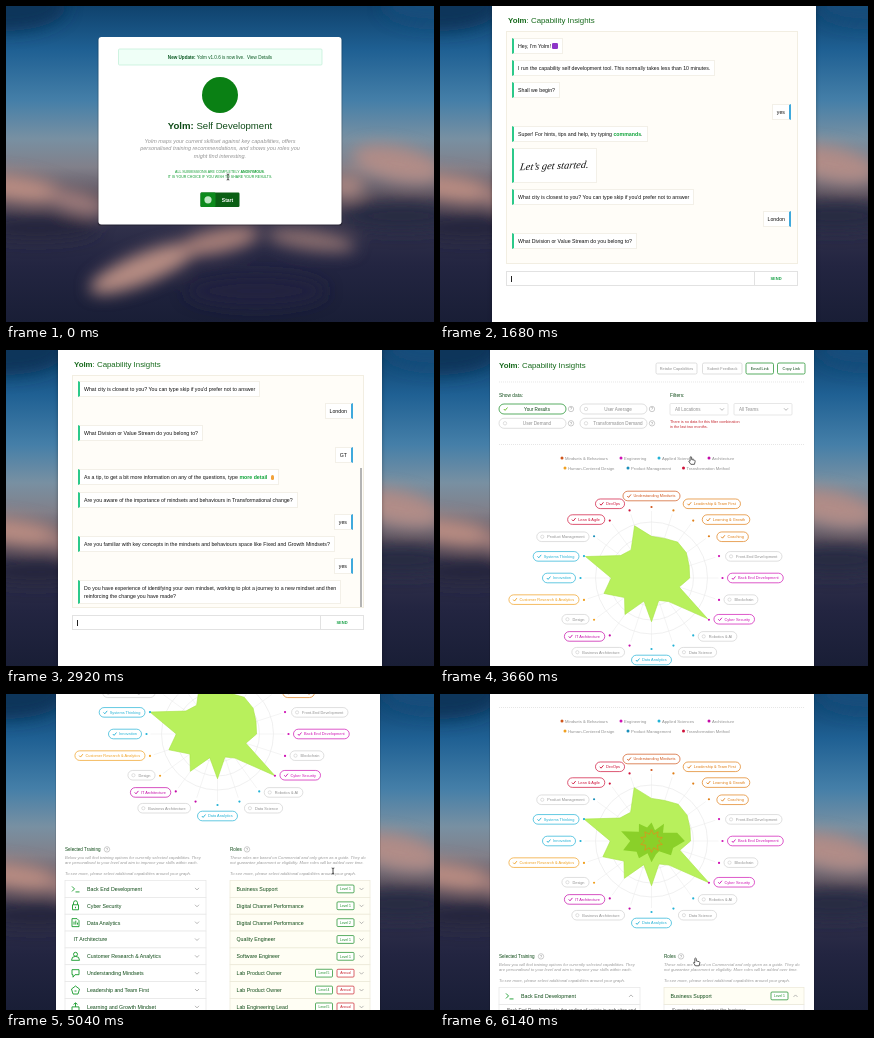
Animation of 428x316 px, one loop 6160 ms. Source, as an HTML page:

```html
<!DOCTYPE html>
<html lang="en">
<head>
<meta charset="utf-8">
<title>Capability Insights</title>
<style>
  html, body { margin: 0; width: 100%; height: 100%; overflow: hidden; }
  body { position: relative; background: #1b2038; font-family: "Liberation Sans", Arial, sans-serif; }
  .layer { position: absolute; left: 0; top: 0; width: 428px; height: 316px; overflow: hidden; }
  svg text { font-family: "Liberation Sans", Arial, sans-serif; white-space: pre; }
  .b { font-weight: bold; }
  .i { font-style: italic; }
  .mid { text-anchor: middle; }
  #chat .page { position: absolute; left: 52px; width: 324px; height: 316px; background: #fff; box-shadow: 0 0 4px #0005; }
  #chat h1 { position: absolute; left: 68px; top: 9px; margin: 0; font: 7.85px/11px "Liberation Sans", Arial, sans-serif; color: #176a1c; }
  #log {
    position: absolute; left: 66px; top: 25px; width: 292px; height: 233px; box-sizing: border-box;
    border: 1px solid #f2eee2; background: #fffdf8; padding: 6px 6px 3px 5px;
    display: flex; flex-direction: column; align-items: flex-start; gap: 6.1px; overflow: hidden;
  }
  #log.full { padding-right: 10px; }
  .msg {
    flex: none; box-sizing: border-box; padding: 3px 4px; font-size: 5.24px; line-height: 8px; color: #111;
    background: #fff; border: 1px solid #f3f0e8; border-left: 2px solid #2cc98a; white-space: nowrap;
  }
  .msg.me { align-self: flex-end; border-left: 1px solid #f3f0e8; border-right: 2px solid #3fa9dc; }
  .msg b { color: #12a53c; }
  .msg .script { display: block; height: 26.5px; width: 74px; font: italic 10.4px/27px "Liberation Serif", Times, serif; text-indent: 2px; transform: rotate(-2deg) skewX(-10deg); }
  .dot { display: inline-block; width: 5.4px; height: 5.4px; border-radius: 1.3px; background: #8d35c8; vertical-align: -0.8px; }
  .tip { width: 3.6px; height: 5px; border-radius: 2px; background: #f2a23a; margin-left: 2px; }
  #thumb { position: absolute; left: 353.5px; width: 2.6px; background: #b4b4b4; }
  #entry { position: absolute; left: 66px; top: 265px; width: 292px; height: 15px; box-sizing: border-box; border: 1px solid #e2e2e2; font-size: 5.24px; line-height: 14px; color: #111; padding-left: 4px; }
  #entry i { display: inline-block; width: .6px; height: 5.6px; background: #222; vertical-align: -1px; }
  #entry b { position: absolute; left: 247px; right: 0; top: 0; height: 13px; border-left: 1px solid #e2e2e2; text-align: center; font-size: 4px; line-height: 14px; color: #16a045; }
</style>
</head>
<body>
<svg class="layer" id="sky" viewBox="0 0 428 316"></svg>
<svg class="layer" id="landing" viewBox="0 0 428 316"></svg>
<div class="layer" id="chat">
  <div class="page"></div>
  <h1><b>Yolm</b>: Capability Insights</h1>
  <div id="log"></div>
  <div id="thumb"></div>
  <div id="entry"><span></span><i></i><b>SEND</b></div>
</div>
<svg class="layer" id="results" viewBox="0 0 428 316"></svg>
<svg class="layer" id="pointer" viewBox="0 0 428 316"></svg>
<script>
const LOOP = 6160, CHAT_AT = 440, RESULTS_AT = 3200;
const $ = id => document.getElementById(id);
const clamp = v => Math.max(0, Math.min(1, v));
const smooth = v => v * v * (3 - 2 * v);
const DARK = '#0d4a16', GREEN = '#148a22', GREY = '#8f8f8f', LINE = '#d2d2d2';

// Drawing helpers; y is the vertical middle of a text line.
const text = (x, y, size, str, fill = '#111', cls = '') =>
  `<text x="${x}" y="${y + size * .36}" font-size="${size}" fill="${fill}" class="${cls}">${str}</text>`;
const box = (x, y, w, h, r, fill, stroke = 'none', extra = '') =>
  `<rect x="${x}" y="${y}" width="${w}" height="${h}" rx="${r}" fill="${fill}" stroke="${stroke}" stroke-width=".7" ${extra}/>`;
const circle = (x, y, r, fill, stroke = 'none') =>
  `<circle cx="${x}" cy="${y}" r="${r}" fill="${fill}" stroke="${stroke}" stroke-width=".6"/>`;
const line = (d, stroke, w = .7, extra = '') =>
  `<path d="${d}" fill="none" stroke="${stroke}" stroke-width="${w}" ${extra}/>`;
const tick = (x, y, c) => line(`M${x - 1.7} ${y}l1.3 1.4 2.4 -2.9`, c, .9);
const chevron = (x, y, id = '') => line(`M${x - 2} ${y - 1}l2 2 2 -2`, '#999', .7, id && `id="${id}"`);
const help = (x, y) => circle(x, y, 2.7, '#fff', '#aaa') + text(x, y, 3.6, '?', '#777', 'mid');
const pen = document.createElement('canvas').getContext('2d');
const widthOf = (str, size) => {
  pen.font = '40px "Liberation Sans", Arial, sans-serif';
  return pen.measureText(str).width * size / 40;
};

// Blurred sky
const blob = (x, y, rx, ry, fill, turn = 0) =>
  `<ellipse cx="${x}" cy="${y}" rx="${rx}" ry="${ry}" fill="${fill}" transform="rotate(${turn} ${x} ${y})"/>`;
const stops = [[0, '#0f426d'], [14, '#1f6093'], [30, '#457fa8'], [42, '#7890a2'], [51, '#81808a'],
  [61, '#5a505d'], [70, '#30304a'], [82, '#232541'], [100, '#191e36']];
$('sky').innerHTML = `<defs><linearGradient id="air" x2="0" y2="1">
  ${stops.map(([o, c]) => `<stop offset="${o}%" stop-color="${c}"/>`).join('')}</linearGradient>
  <filter id="blur" x="-50%" y="-50%" width="200%" height="200%"><feGaussianBlur stdDeviation="8"/></filter></defs>
  <rect width="428" height="316" fill="url(#air)"/><g filter="url(#blur)">
  ${blob(10, 182, 50, 13, '#b98c82', 8)}${blob(70, 196, 32, 10, '#a07d7b', 15)}
  ${blob(30, 222, 62, 12, '#27273d')}${blob(392, 158, 46, 17, '#b18c87', 12)}
  ${blob(340, 180, 18, 12, '#a98580')}${blob(395, 210, 62, 15, '#252a43')}
  ${blob(138, 262, 58, 15, '#b78d83', -22)}${blob(212, 235, 42, 12, '#a98079', -12)}
  ${blob(305, 234, 45, 10, '#8d6f70', 8)}${blob(250, 285, 70, 16, '#222440')}
  ${blob(0, 0, 60, 25, '#0b355a')}${blob(428, 0, 50, 18, '#164d7b')}</g>`;

// Landing card
const NAME = '<tspan class="b">Yolm</tspan>';
$('landing').innerHTML =
  box(91.5, 31.5, 245, 188.5, 3, '#0003') + box(92.5, 31, 243, 187.5, 3, '#fff') +
  box(112.5, 43, 203.5, 16, 1, '#effff7', '#bdeed6') +
  text(214, 51, 4.6, '<tspan class="b">New Update:</tspan> Yolm v1.0.6 is now live.  View Details', '#0c5a24', 'mid') +
  circle(214, 89, 18, '#0a8014') +
  text(214, 119.3, 9.6, '<tspan class="b">Yolm:</tspan> Self Development', DARK, 'mid') +
  ['Yolm maps your current skillset against key capabilities, offers',
   'personalised training recommendations, and shows you roles you',
   'might find interesting.'].map((s, i) => text(214, 134.7 + i * 7.6, 5.5, s, '#949494', 'mid i')).join('') +
  text(214, 165.3, 3.56, 'ALL SUBMISSIONS ARE COMPLETELY <tspan class="b">ANONYMOUS</tspan>.', '#0a9a2c', 'mid') +
  text(214, 170.5, 3.56, 'IT IS YOUR CHOICE IF YOU WISH TO SHARE YOUR RESULTS.', '#0a9a2c', 'mid') +
  box(194.5, 186.5, 39, 14.5, 1.2, '#0a5f14') + box(194.5, 186.5, 15, 14.5, 1.2, '#0c8a1c') +
  circle(202, 193.8, 3.6, '#bfe8c4') + text(221.5, 193.8, 5, 'Start', '#fff', 'mid b');

// Chat script: time, text, own message
const script = [
  [480, 'Hey, I\'m Yolm! <span class="dot"></span>'],
  [580, 'I run the capability self development tool. This normally takes less than 10 minutes.'],
  [690, 'Shall we begin?'],
  [920, 'yes', 1],
  [1000, 'Super! For hints, tips and help, try typing <b>commands</b>.'],
  [1090, '<span class="script">Let\u2019s get started.</span>'],
  [1190, 'What city is closest to you? You can type skip if you\'d prefer not to answer'],
  [1480, 'London', 1],
  [1570, 'What Division or Value Stream do you belong to?'],
  [1940, 'GT', 1],
  [2040, 'As a tip, to get a bit more information on any of the questions, type <b>more detail</b> <span class="dot tip"></span>'],
  [2140, 'Are you aware of the importance of mindsets and behaviours in Transformational change?'],
  [2400, 'yes', 1],
  [2480, 'Are you familiar with key concepts in the mindsets and behaviours space like Fixed and Growth Mindsets?'],
  [2740, 'yes', 1],
  [2820, 'Do you have experience of identifying your own mindset, working to plot a journey to a new mindset and then<br>reinforcing the change you have made?'],
];
const typed = [[760, 'yes', 920], [1240, 'London', 1480], [1800, 'GT', 1940], [2260, 'yes', 2400], [2600, 'yes', 2740], [3000, 'yes', 3140]];
const log = $('log');
const msgs = script.map(([at, html, me]) => {
  const el = document.createElement('div');
  el.className = me ? 'msg me' : 'msg';
  el.innerHTML = html;
  log.append(el);
  return { at, el };
});

// Results: controls
const button = (x, w, label, on) =>
  box(x, 13, w, 11, 1.5, '#fff', on ? GREEN : LINE) + text(x + w / 2, 18.4, 3.9, label, on ? DARK : GREY, 'mid');
const toggle = (x, y, label, on, id = '') =>
  box(x, y - 5, 67, 10, 5, '#fff', on ? GREEN : LINE, id && `id="${id}"`) +
  (on ? tick(x + 6.5, y, '#63b81e') : circle(x + 6, y, 1.7, '#fff', '#ccc')) +
  text(x + 38, y, 4.6, label, on ? DARK : GREY, 'mid') + help(x + 72, y);
const select = (x, label) =>
  box(x, 53.5, 58, 11.5, 1, '#fff', '#ddd') + text(x + 5, 59.3, 4.5, label, GREY) + chevron(x + 52, 59.3);
const dotted = y => line(`M59 ${y}H365`, '#dcdcdc', .7, 'stroke-dasharray="1 1"');
const controls =
  text(59, 14.8, 7.85, NAME + ': Capability Insights', '#176a1c') +
  button(216, 41, 'Retake Capabilities') + button(262.5, 39.5, 'Submit Feedback') +
  button(306, 27.5, 'Email Link', 1) + button(337.5, 27.5, 'Copy Link', 1) +
  dotted(32) + text(59, 45, 4.8, 'Show data:', DARK) + text(230, 45, 4.8, 'Filters:', DARK) +
  toggle(59, 59, 'Your Results', 1) + toggle(140, 59, 'User Average') +
  toggle(59, 73.3, 'User Demand') + toggle(140, 73.3, 'Transformation Demand', 0, 'demand') +
  select(230, 'All Locations') + select(294, 'All Teams') +
  text(230, 71.4, 3.8, 'There is no data for this filter combination', '#c4232b') +
  text(230, 76.8, 3.8, 'in the last two months.', '#c4232b') + dotted(94.5);

// Results: legend and radar chart
const hue = { m: '#d0561c', e: '#cf12b4', s: '#22b2d6', a: '#c40aa8', h: '#f0a020', p: '#1a8fba', t: '#cf1038' };
const legend = [
  [122, 108, 'm', 'Mindsets &amp; Behaviours'], [181, 108, 'e', 'Engineering'], [219, 108, 's', 'Applied Sciences'],
  [269, 108, 'a', 'Architecture'], [125, 118, 'h', 'Human-Centered Design'], [188, 118, 'p', 'Product Management'],
  [243.5, 118, 't', 'Transformation Method'],
].map(([x, y, k, s]) => circle(x, y, 1.5, hue[k]) + text(x + 3, y, 4.2, s, GREY)).join('');

const CX = 211.5, CY = 228, R = 71;
const polar = (i, r) => [CX + r * Math.sin(i * Math.PI / 10), CY - r * Math.cos(i * Math.PI / 10)];
const shape = list => list.map((f, i) => polar(i, f * R).map(v => v.toFixed(2)).join()).join(' ');
// Category key, label, selected, score
const axes = [
  ['m', 'Understanding Mindsets', 1, .6], ['h', 'Leadership & Team First', 1, .6], ['h', 'Learning & Growth', 1, .64],
  ['h', 'Coaching', 1, .62], ['e', 'Front-End Development', 0, .57], ['e', 'Back End Development', 1, .55],
  ['e', 'Blockchain', 0, .42], ['e', 'Cyber Security', 1, 1], ['s', 'Robotics & AI', 0, .42],
  ['s', 'Data Science', 0, .34], ['s', 'Data Analytics', 1, .63], ['a', 'Business Architecture', 0, .35],
  ['a', 'IT Architecture', 1, .65], ['h', 'Design', 0, .48], ['h', 'Customer Research & Analytics', 1, .72],
  ['s', 'Innovation', 1, .58], ['s', 'Systems Thinking', 1, 1], ['p', 'Product Management', 0, .55],
  ['t', 'Lean & Agile', 1, .5], ['t', 'DevOps', 1, .79],
];
axes[0][0] = axes[0][0];
const tint = (k, i) => i > 0 && i < 4 ? '#e07f18' : hue[k];
const labels = axes.map(([k, label, on], i) => {
  const cos = Math.cos(i * Math.PI / 10), w = widthOf(label, 3.9) + 15;
  const y = CY - (70 + 12 * cos ** 8) * cos, [dx, dy] = polar(i, R);
  const x = i % 10 === 0 ? CX - w / 2 : i < 10 ? dx + 5 + 5 * Math.max(0, cos) : dx - 5 - w;
  const c = tint(k, i);
  return circle(dx, dy, 1.1, c) + box(x, y - 4.8, w, 9.6, 4.8, '#fff', on ? c : LINE) +
    (on ? tick(x + 6, y, c) : circle(x + 5.5, y, 1.6, '#fff', '#ccc')) +
    text(x + 10.5, y, 3.9, label.replace('&', '&amp;'), on ? c : GREY);
}).join('');
const grid = [14, 28, 42, 56].map(r => circle(CX, CY, r, 'none', '#e6e6e6')).join('') +
  axes.map((_, i) => line(`M${CX} ${CY}L${polar(i, 67)}`, '#e9e9e9', .5)).join('');
const role = [.26, .16, .3, .2, .38, .47, .32, .34, .18, .2, .3, .18, .3, .26, .42, .3, .45, .22, .3, .2];
const chart = grid +
  `<polygon id="score" points="${shape(axes.map(a => a[3]))}" fill="#b8f05c" stroke="#a6e244" stroke-width=".6"/>` +
  `<g id="role"><polygon points="${shape(role)}" fill="#77c414" fill-opacity=".7"/>` +
  `<polygon points="${shape(role.map((_, i) => i % 2 ? .1 : .16))}" fill="none" stroke="#e88b1c" stroke-width=".7"/></g>` + labels;

// Results: training and role lists
const STEP = 16.85, TOP = 374.5, BODY = 44;
const icons = [
  'M-3.5 -2.5l2.5 2.5 -2.5 2.5M0 3h4', 'M-3 -1h6v5h-6zM-2 -1v-2a2 2 0 0 1 4 0v2M0 1v1.5',
  'M-3.5 4v-8h5l2 2v6zM-1.5 2v-3M.3 2v-4M2 2v-2', '',
  'M-2 -2a2 2 0 1 0 4 0a2 2 0 1 0 -4 0M-4 4q0 -4 4 -4t4 4z', 'M-3.5 -3.5h7v5h-4l-2 2.5v-2.5h-1z',
  'M0 -4l4 3 -1.5 5h-5l-1.5 -5zM-1 1h2', 'M-3.5 4v-4h7v4zM0 0v-4M-2 -2.5l2 -1.5 2 1.5',
];
const training = ['Back End Development', 'Cyber Security', 'Data Analytics', 'IT Architecture',
  'Customer Research &amp; Analytics', 'Understanding Mindsets', 'Leadership and Team First', 'Learning and Growth Mindset'];
const roles = [['Business Support', 1], ['Digital Channel Performance', 1], ['Digital Channel Performance', 2],
  ['Quality Engineer', 1], ['Software Engineer', 1], ['Lab Product Owner', 5, 1], ['Lab Product Owner', 4, 1], ['Lab Engineering Lead', 5, 1]];
const badge = (x, y, s, c) => box(x, y - 3.9, 17, 7.8, 1, '#fff', c) + text(x + 8.5, y, 3.4, s, c, 'mid');
const trainRow = (name, i) => {
  const y = TOP + i * STEP, m = y + STEP / 2, icon = icons[i];
  return box(59, y, 141, STEP, 0, '#fff', '#e6e6e6') +
    (icon ? line(icon, '#159a2a', .9, `transform="translate(69.5 ${m})"`) : '') +
    text(icon ? 81 : 67.5, m, 5.25, name, DARK) + chevron(191, m, i ? '' : 'turnA');
};
const roleRow = ([name, level, annual], i) => {
  const y = TOP + i * STEP, m = y + STEP / 2;
  return box(224, y, 140, STEP, 0, '#fffef4', '#ebe8d8') + text(230.5, m, 5.25, name, DARK) +
    badge(annual ? 309.5 : 331, m, 'Level ' + level, GREEN) + (annual ? badge(331, m, 'Annual', '#c9222c') : '') +
    chevron(355.5, m, i ? '' : 'turnB');
};
const body = (id, x, w, rows) => `<g id="${id}">${box(x, TOP + STEP, w, BODY, 0, '#fff', '#e6e6e6')}${
  rows.map((s, i) => text(x + 8, 397.5 + i * 6.5, 4.6, s, '#555')).join('')}</g>`;
const list = (id, rows, draw) => draw(rows[0], 0) + `<g id="${id}">${rows.slice(1).map((r, i) => draw(r, i + 1)).join('')}</g>`;
const notes = (x, rows) => rows.map((s, i) => text(x, [351.2, 356.8, 367.6][i], 4.15, s, '#999', 'i')).join('');
const more = 'To see more, please select additional capabilities around your graph.';
const lists =
  text(59, 343.4, 4.6, 'Selected Training', DARK) + help(101, 343.4) + text(224, 343.4, 4.6, 'Roles', DARK) + help(241, 343.4) +
  notes(59, ['Below you will find training options for currently selected capabilities. They', 'are personalised to your level and aim to improve your skills within each.', more]) +
  notes(224, ['These roles are based on Commercial and only given as a guide. They do', 'not guarantee placement or eligibility. More roles will be added over time.', more]) +
  body('bodyA', 59, 141, ['Back End Development is the coding of scripts in web sites and', 'services that run on the server.']) +
  body('bodyB', 224, 140, ['Supports teams across the business.']) +
  list('restA', training, trainRow) + list('restB', roles, roleRow);
$('results').innerHTML = box(49.5, -4, 325, 324, 0, '#0003') + box(50, -4, 324, 324, 0, '#fff') +
  `<g id="page">${controls}${legend}${chart}${lists}</g>`;

// Pointer
$('pointer').innerHTML = `<g id="mouse">
  <path id="hand" d="M-1.2 -3.5q.9 -.9 1.5 .1v2.4l3 .7q.7 .3 .5 1.3l-.7 2.8h-3.6l-2 -2.9q0 -1 1.3 -.3z" fill="#fff" stroke="#222" stroke-width=".7"/>
  <path id="beam" d="M-1.3 -3q1.3 0 1.3 .8q0 -.8 1.3 -.8M0 -2.4v4.8M-1.3 3q1.3 0 1.3 -.8q0 .8 1.3 .8" fill="none" stroke="#222" stroke-width=".8"/></g>`;

// Timeline
function track(t, keys, col = 1) {
  let i = 0;
  while (i < keys.length - 1 && t >= keys[i + 1][0]) i++;
  const a = keys[i], b = keys[i + 1] || a;
  return a === b ? a[col] : a[col] + (b[col] - a[col]) * smooth(clamp((t - a[0]) / (b[0] - a[0])));
}
const mouse = [[0, 222, 171], [100, 222, 171], [320, 218, 195], [3300, 300, 130], [3700, 250, 110], [4100, 192, 92],
  [4440, 158, 76], [4620, 158, 76], [5000, 327, 177], [5080, 327, 177], [5280, 150, 195], [5420, 150, 195], [5640, 256, 268]];
const scroll = [[4600, 0], [5000, 188], [5420, 188], [5640, 115], [5880, 115], [6130, 81]];
const show = (el, on) => { el.style.display = on ? '' : 'none'; };
const grow = (el, k) => el.setAttribute('transform', `translate(${CX} ${CY}) scale(${k}) translate(${-CX} ${-CY})`);

function drawChat(t) {
  msgs.forEach(m => show(m.el, t >= m.at));
  log.classList.remove('full');
  const full = log.scrollHeight > log.clientHeight;
  log.classList.toggle('full', full);
  log.scrollTop = log.scrollHeight;
  show($('thumb'), full);
  const unit = 231 / log.scrollHeight;
  $('thumb').style.top = 26 + log.scrollTop * unit + 'px';
  $('thumb').style.height = log.clientHeight * unit + 'px';
  const now = typed.find(([from, , to]) => t >= from && t < to);
  $('entry').firstChild.textContent = now ? now[1].slice(0, 1 + Math.floor((t - now[0]) / 36)) : '';
}

function accordion(side, x, t, at) {
  const k = smooth(clamp((t - at) / 120)), y = TOP + STEP / 2;
  $('rest' + side).setAttribute('transform', `translate(0 ${BODY * k})`);
  show($('body' + side), k > 0);
  $('turn' + side).setAttribute('transform', k > .5 ? `rotate(180 ${x} ${y})` : '');
}

function drawResults(t) {
  $('page').setAttribute('transform', `translate(0 ${-track(t, scroll)})`);
  grow($('score'), smooth(clamp((t - 3260) / 440)));
  grow($('role'), smooth(clamp((t - 5700) / 180)));
  $('demand').setAttribute('stroke', t > 4380 && t < 4640 ? GREEN : LINE);
  accordion('A', 191, t, 5330);
  accordion('B', 355.5, t, 5690);
}

function drawMouse(t) {
  show($('mouse'), t < CHAT_AT || t >= 3300);
  $('mouse').setAttribute('transform', `translate(${track(t, mouse)} ${track(t, mouse, 2)})`);
  const beam = t < 160 || (t > 4800 && t < 5120);
  show($('beam'), beam);
  show($('hand'), !beam);
}

const start = performance.now();
function frame() {
  const t = (performance.now() - start) % LOOP;
  const chatting = t >= CHAT_AT && t < RESULTS_AT;
  show($('landing'), t < CHAT_AT);
  show($('chat'), chatting);
  show($('results'), t >= RESULTS_AT);
  if (chatting) drawChat(t);
  if (t >= RESULTS_AT) drawResults(t);
  drawMouse(t);
  requestAnimationFrame(frame);
}
frame();
</script>
</body>
</html>
```
